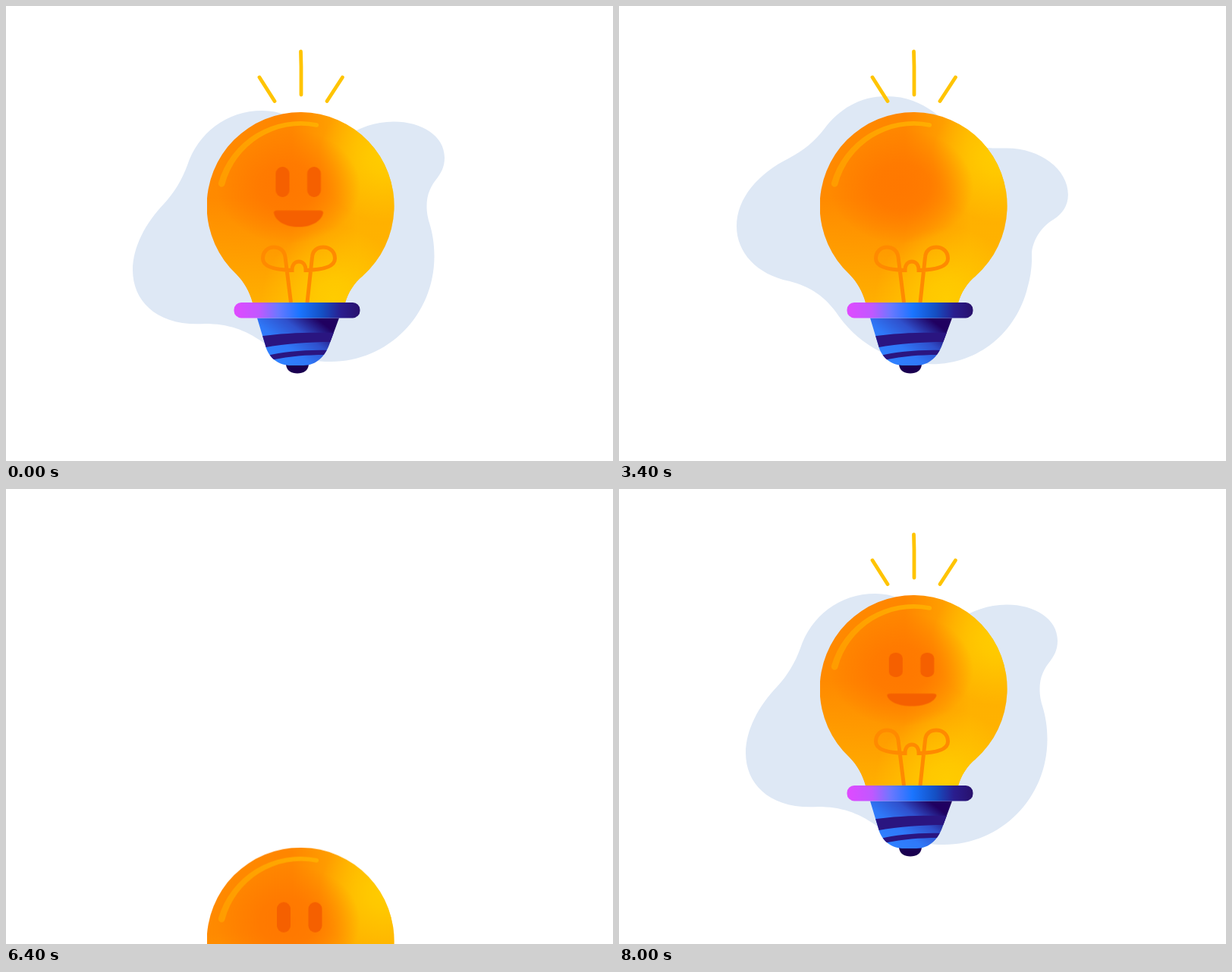
These frames come from a looping animation (800 px wide and 600 px high, 8.04 s). An HTML page:

```html
<!DOCTYPE html>
<html lang="en">
<head>
<meta charset="utf-8">
<title>Light bulb</title>
<style>
  html, body { margin: 0; width: 100%; height: 100%; overflow: hidden; background: #fff; }
  svg { display: block; width: 100vw; height: 100vh; }

  .loop { animation: 8040ms linear infinite; }
  #blob { animation-name: morph, pop; animation-duration: 8040ms, 8040ms;
    animation-iteration-count: infinite, infinite; transform-origin: 400px 300px; fill: #dee8f5; }
  #bulb { animation-name: travel; }
  #tilt { animation-name: tilt; transform-origin: 388px 263px; }
  #glass { animation-name: glow; }
  #rays path { animation-name: flash; stroke-dasharray: 1 2; }
  #face { animation-name: turn; transform-origin: 387px 250px; }
  #eyes { animation-name: blink; transform-origin: 387px 232px; }
  #mouth { animation-name: smile; transform-origin: 387px 270px; }

  @keyframes morph {
    0% {
      d: path("M338 138C392 138 420 190 448 172C465 161 486 152.5 511 152.5C548 152.5 578 171 578 200C578 213 573 220 569 226C560 237 554.5 248 554.5 264C554.5 273 556 279 558 286C562 299 564.5 313 564.5 330C564.5 408 503 469 428 469C390 469 363 459 338 443C315 427 293 419 262 419C200 423 167 390 167 348C167 318 184 286 208 261C222 246 232 229 239 210C253 168 290 138 338 138Z");
      animation-timing-function: cubic-bezier(.33, .1, .67, 1);
    }
    74.63% {
      d: path("M361 108C414 108 434 136 450 164C471 207 491 208 511 208C560 208 600 242 600 277C600 293 591 306 576 313C558 320 542 339 538 359C538 361 537 363 536 364C533 375 529 386 523 396C500 443 457 474 404 474C348 474 293 443 262 390C247 357 229 342 202 330C171 314 148 287 148 257C148 215 184 182 234 165C256 158 273 149 289 134C311 118 333 108 361 108Z");
      animation-timing-function: step-start;
    }
    100% {
      d: path("M338 138C392 138 420 190 448 172C465 161 486 152.5 511 152.5C548 152.5 578 171 578 200C578 213 573 220 569 226C560 237 554.5 248 554.5 264C554.5 273 556 279 558 286C562 299 564.5 313 564.5 330C564.5 408 503 469 428 469C390 469 363 459 338 443C315 427 293 419 262 419C200 423 167 390 167 348C167 318 184 286 208 261C222 246 232 229 239 210C253 168 290 138 338 138Z");
    }
  }
  @keyframes pop {
    0% { transform: scale(1); }
    69.65% { transform: scale(1); animation-timing-function: cubic-bezier(.895, .03, .685, .22); }
    74.63% { transform: scale(0); }
    91.54% { transform: scale(0); animation-timing-function: cubic-bezier(.215, .61, .355, 1); }
    96.52%, 100% { transform: scale(1); }
  }
  @keyframes travel {
    0% { transform: translateY(0); }
    76.12% { transform: translateY(0); animation-timing-function: cubic-bezier(.55, .055, .675, .19); }
    80.1% { transform: translateY(470px); }
    83.08% { transform: translateY(470px); animation-timing-function: cubic-bezier(.215, .61, .355, 1); }
    89.55%, 100% { transform: translateY(0); }
  }
  @keyframes tilt {
    0%, 81% { transform: rotate(0deg); }
    83.08% { transform: rotate(10deg); animation-timing-function: ease-out; }
    87.06% { transform: rotate(1.55deg); animation-timing-function: ease-out; }
    89.55%, 100% { transform: rotate(0deg); }
  }
  @keyframes glow {
    0%, 80.1% { opacity: 1; }
    80.2%, 85.57% { opacity: 0; }
    90.05%, 100% { opacity: 1; }
  }
  @keyframes flash {
    0%, 5%, 27%, 46%, 69%, 76.2%, 92.5%, 100% { stroke-dashoffset: 0; }
    7%, 25%, 48%, 67%, 77.7%, 90.5% { stroke-dashoffset: 1.1; }
  }
  @keyframes turn {
    0% { transform: translateX(-1.5px); animation-timing-function: ease-out; }
    4% { transform: translateX(-10px) scaleX(.98); animation-timing-function: ease-in-out; }
    13%, 18.5% { transform: translateX(92px) scaleX(.755); animation-timing-function: ease-in; }
    23% { transform: translateX(165px) scaleX(.25); animation-timing-function: step-start; }
    23.01% { transform: translateX(-165px) scaleX(.25); }
    60% { transform: translateX(-165px) scaleX(.25); animation-timing-function: ease-out; }
    67%, 97.5% { transform: translateX(0) scaleX(1); }
    100% { transform: translateX(-1.5px); }
  }
  @keyframes blink {
    0%, 15.4%, 17.4%, 80.1% { transform: scaleY(1); }
    16.42% { transform: scaleY(.45); }
    80.2%, 97.51% { transform: scaleY(0); }
    100% { transform: scaleY(1); }
  }
  @keyframes smile {
    0%, 23% { transform: scaleY(.64); }
    60%, 80.1% { transform: scaleY(1); }
    80.2%, 98.01% { transform: scaleY(0); }
    100% { transform: scaleY(.64); }
  }
</style>
</head>
<body>
<svg viewBox="0 0 800 600">
  <defs>
    <path id="shape" d="M325 391C321 377 314 364 304 354A123.5 123.5 0 1 1 470 356C458 366 451 378 447 391Z"/>
    <path id="screw" d="M331 411.5H439L427 444C421 462 409 474 392 474H376C359 474 346 464 342 448Z"/>
    <clipPath id="inGlass"><use href="#shape"/></clipPath>
    <clipPath id="inScrew"><use href="#screw"/></clipPath>
    <linearGradient id="amber">
      <stop offset="0" stop-color="#ff8a00"/>
      <stop offset=".45" stop-color="#ff8600"/>
      <stop offset=".8" stop-color="#ffb000"/>
    </linearGradient>
    <linearGradient id="floor" x2="0" y2="1">
      <stop offset=".45" stop-color="#ffb400" stop-opacity="0"/>
      <stop offset="1" stop-color="#ffb400" stop-opacity=".9"/>
    </linearGradient>
    <radialGradient id="lemon">
      <stop offset="0" stop-color="#ffcc00"/>
      <stop offset=".25" stop-color="#ffcc00" stop-opacity=".85"/>
      <stop offset="1" stop-color="#ffcc00" stop-opacity="0"/>
    </radialGradient>
    <radialGradient id="core">
      <stop offset="0" stop-color="#ff7800"/>
      <stop offset=".4" stop-color="#ff7800" stop-opacity=".85"/>
      <stop offset="1" stop-color="#ff7800" stop-opacity="0"/>
    </radialGradient>
    <linearGradient id="shine">
      <stop offset="0" stop-color="#ff9c00"/>
      <stop offset="1" stop-color="#ffae00"/>
    </linearGradient>
    <linearGradient id="band">
      <stop offset="0" stop-color="#e04aff"/>
      <stop offset=".2" stop-color="#c058ff"/>
      <stop offset=".35" stop-color="#6a78ff"/>
      <stop offset=".52" stop-color="#1a75ff"/>
      <stop offset=".7" stop-color="#1450c4"/>
      <stop offset=".85" stop-color="#2a1d8e"/>
      <stop offset="1" stop-color="#28106c"/>
    </linearGradient>
    <linearGradient id="metal" gradientUnits="userSpaceOnUse" x1="366" y1="474" x2="412" y2="414">
      <stop offset="0" stop-color="#2f80ff"/>
      <stop offset=".3" stop-color="#2f78f8"/>
      <stop offset=".65" stop-color="#2f50cc"/>
      <stop offset="1" stop-color="#200060"/>
    </linearGradient>
  </defs>

  <path id="blob"/>

  <g id="rays" fill="none" stroke="#ffc400" stroke-width="4.8" stroke-linecap="round" stroke-linejoin="round">
    <path class="loop" pathLength="1" d="M389 117V80L388.5 60"/>
    <path class="loop" pathLength="1" d="M354 125.5L334 94"/>
    <path class="loop" pathLength="1" d="M423 125.5L443.5 94"/>
  </g>

  <g id="bulb" class="loop"><g id="tilt" class="loop">
    <g id="glass" class="loop">
      <g clip-path="url(#inGlass)">
        <rect x="265" y="140" width="248" height="252" fill="url(#amber)"/>
        <rect x="265" y="140" width="248" height="252" fill="url(#floor)"/>
        <circle cx="498" cy="200" r="85" fill="url(#lemon)"/>
        <circle cx="432" cy="386" r="95" fill="url(#lemon)"/>
        <ellipse cx="372" cy="238" rx="95" ry="75" fill="url(#core)"/>
      </g>
      <path fill="url(#shine)" d="M280 233A112 112 0 0 1 410 154.3A2.8 2.8 0 0 1 409 159.8A104 104 0 0 0 288.3 235.5A4.3 4.3 0 0 1 280 233Z"/>
      <path fill="none" stroke="#ff8a00" stroke-width="5" d="M375.5 391L368 331C367 323 361 318 353 318C345 318 338.5 324 338.5 333C338.5 344 356 348 377 348.5C377 341 381 337 386 337C391 337 395 341 395 348.5C416 348 433.5 344 433.5 333C433.5 324 427 318 418 318C410 318 404 323 403.5 331L397 391"/>
    </g>
    <g clip-path="url(#inGlass)">
      <g id="face" class="loop" fill="#f56000">
        <g id="eyes" class="loop">
          <rect x="357" y="212" width="18" height="40" rx="9"/>
          <rect x="398.5" y="212" width="18" height="40" rx="9"/>
        </g>
        <path id="mouth" class="loop" d="M359 269.5H415Q420 269.5 419.5 275C417 292 404 303.5 387 303.5C370 303.5 357 292 354.5 275Q354 269.5 359 269.5Z"/>
      </g>
    </g>
    <path fill="#1a0050" d="M369 473H399C398 481 392 484.5 384 484.5C376 484.5 370 481 369 473Z"/>
    <use href="#screw" fill="url(#metal)"/>
    <g clip-path="url(#inScrew)" fill="#2a1580">
      <path d="M335 435.5C365 431 400 430 437 431L428 443C400 443 370 445 340 450.5Z"/>
      <path d="M344 461C365 456 395 453 426 454L421 460C395 460 375 462 351 466.5Z"/>
    </g>
    <rect x="300.5" y="391" width="166" height="20.4" rx="9.5" fill="url(#band)"/>
  </g></g>
</svg>
</body>
</html>
```
